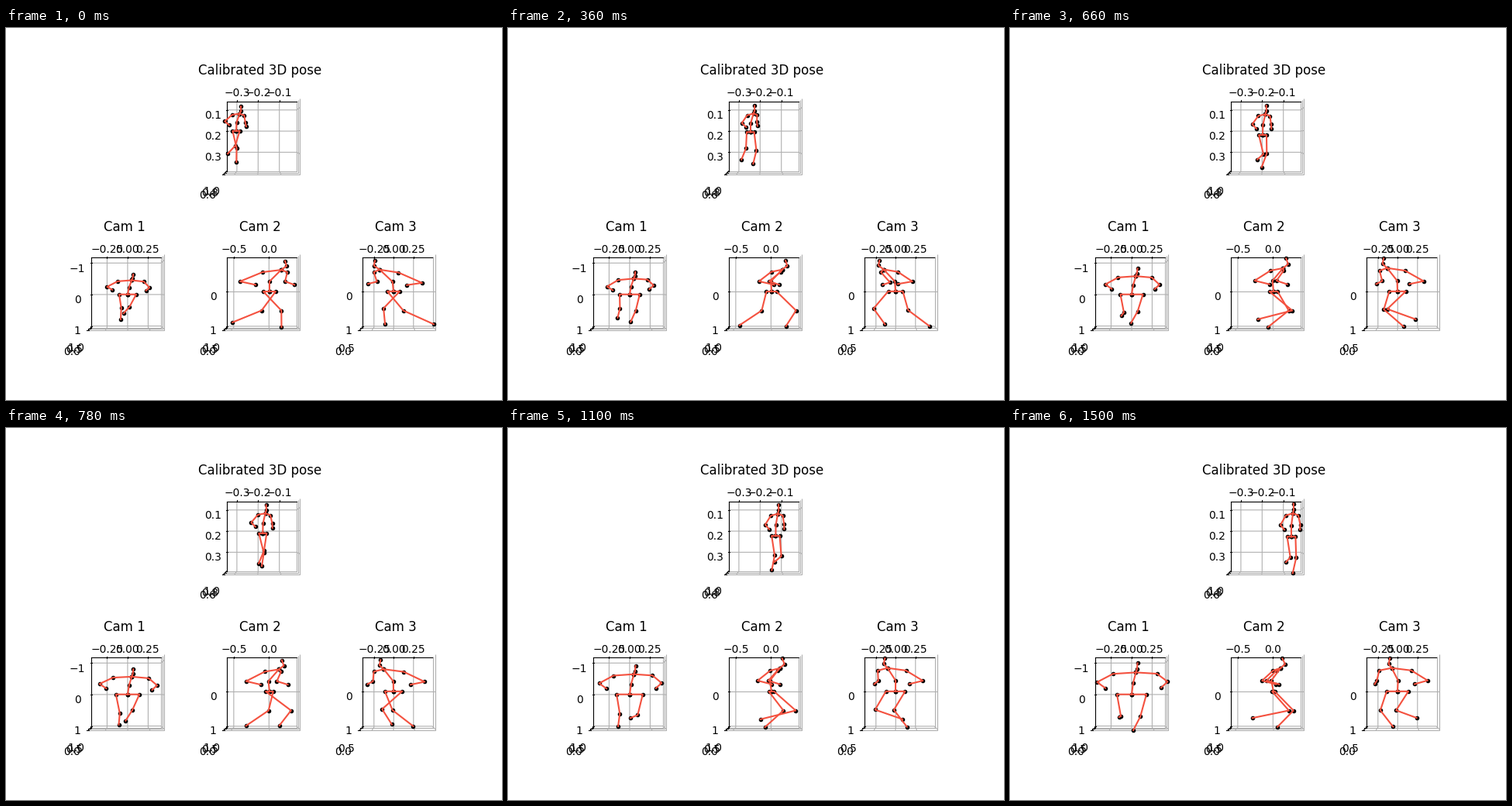
A matplotlib script that plays this animation: 640x480 px, repeating every 1520 ms.

```python
import numpy as np
import matplotlib.pyplot as plt
from matplotlib.animation import FuncAnimation
from matplotlib.lines import Line2D

W, H, STEP, FRAMES = 640, 480, 20, 76
STRIDE = 880  # one full gait cycle, ms

t = np.arange(FRAMES) * STEP
tau = t / 1500
phase = 2 * np.pi * (t + 20) / STRIDE
bounce = np.cos(2 * phase)

fig = plt.figure(figsize=(W / 100, H / 100), dpi=100)


def stage(slot, title, xlim, ylim, zlim, xticks, yticks, zticks):
    ax = fig.add_subplot(2, 3, slot, projection="3d")
    ax.view_init(elev=-90, azim=-90)
    ax.set_title(title)
    ax.set(xlim=xlim, ylim=ylim, zlim=zlim)
    ax.set(xticks=xticks, yticks=yticks, zticks=zticks)
    for axis in (ax.xaxis, ax.yaxis, ax.zaxis):
        axis.set_pane_color("white")


stage(2, "Calibrated 3D pose", (-0.347, -0.019), (0.0594, 0.3888), (0.58, 1.05),
      [-0.3, -0.2, -0.1], [0.1, 0.2, 0.3], [0.6, 0.8, 1.0])
stage(4, "Cam 1", (-0.443, 0.405), (-1.171, 1.04), (-0.02, 1.1),
      [-0.25, 0, 0.25], [-1, 0, 1], [0, 0.5, 1])
stage(5, "Cam 2", (-0.597, 0.391), (-0.995, 1.03), (-0.02, 1.1),
      [-0.5, 0], [0, 1], [0, 0.5, 1])
stage(6, "Cam 3", (-0.394, 0.487), (-0.995, 1.03), (-0.01, 0.75),
      [-0.25, 0, 0.25], [0, 1], [0, 0.5])


def cycle(points, p):
    """Smooth closed curve through evenly spaced points of one stride."""
    c = np.fft.rfft(points) / len(points)
    return c[0].real + 2 * sum((c[k] * np.exp(1j * k * p)).real for k in (1, 2, 3))


def joint(across, ahead, down):
    """One body joint over time, relative to the pelvis."""
    return np.array([across + 0 * t, ahead + 0 * t, down + 0 * t])


def leg(side):
    p = phase + np.pi * (side > 0)
    knee = cycle([22, 22, 18, -3, -14, -8, 22, 30], p)
    foot = cycle([20, 11, -8, -33, -48, -53, -26, 3], p)
    drop = cycle([46, 45, 46, 45, 41, 35, 35, 42], p)
    return [pelvis, joint(side, 0, 0), joint(0.65 * side, knee, 24.5),
            joint(0.45 * side, foot, drop)]


def arm(side):
    swing = -np.cos(phase + np.pi * (side > 0))
    return [thorax, joint(1.5 * side, 7 + 4 * swing, -26 * rise),
            joint(2.4 * side, -9 + 10 * swing, -13.5 * rise),
            joint(1.9 * side, 7 + 10 * swing, -9 * rise)]


rise = 1 - 0.04 * bounce
pelvis = joint(0, 0, 0)
thorax = joint(0, 15, -29 * rise)
trunk = [pelvis, joint(0, 0, -13.5 * rise), thorax,
         joint(0, 22, -34 * rise), joint(0, 20, -41 * rise)]
body = [np.array(c) for c in (trunk, leg(-1), leg(1), arm(-1), arm(1))]


def view(x, y, side, ahead, tilt, lift, slope):
    """Project the body to the stage; (start, end) pairs follow the slow turn."""
    def drift(pair):
        return pair[0] + (pair[1] - pair[0]) * tau

    chains = []
    for c in body:
        u, f, h = c[:, 0], c[:, 1], c[:, 2]
        px = x + drift(side) * u + drift(ahead) * f + drift(tilt) * h
        py = y + drift(lift) * h + drift(slope) * f
        chains.append(np.stack([px, H + 0.5 - py]))
    return chains


bodies = (
    view(297 + 66 * tau, 135 + 4 * tau - 1.8 * bounce, side=(4.6, 5.4),
         ahead=(0.22, 0.14), tilt=(-0.04, 0), lift=(0.84, 1.04), slope=(0.08, 0.08))
    + view(157, 344.2, side=(11, 19), ahead=(0.1, 0.1), tilt=(-0.13, -0.13),
           lift=(0.68, 1.03), slope=(0.05, 0.18))
    + view(340, 340.5, side=(8, 1.8), ahead=(1, 1), tilt=(0, 0.2),
           lift=(1, 1), slope=(0, 0))
    + view(500, 340.3, side=(-8, -14), ahead=(-1, -0.6), tilt=(0.1, -0.05),
           lift=(0.96, 1), slope=(-0.08, 0)))


def layer(**style):
    line = Line2D([], [], transform=None, **style)
    fig.add_artist(line)
    return line


dots = layer(ls="none", marker="o", ms=3, mew=1, color="black", zorder=5)
bones = [layer(color="#f4513f", lw=1.5, zorder=6) for _ in bodies]


def draw(i):
    for bone, chain in zip(bones, bodies):
        bone.set_data(*chain[:, :, i])
    dots.set_data(np.hstack([bone.get_data() for bone in bones]))
    return [dots, *bones]


anim = FuncAnimation(fig, draw, frames=FRAMES, interval=STEP, repeat=True)
plt.show()
```
